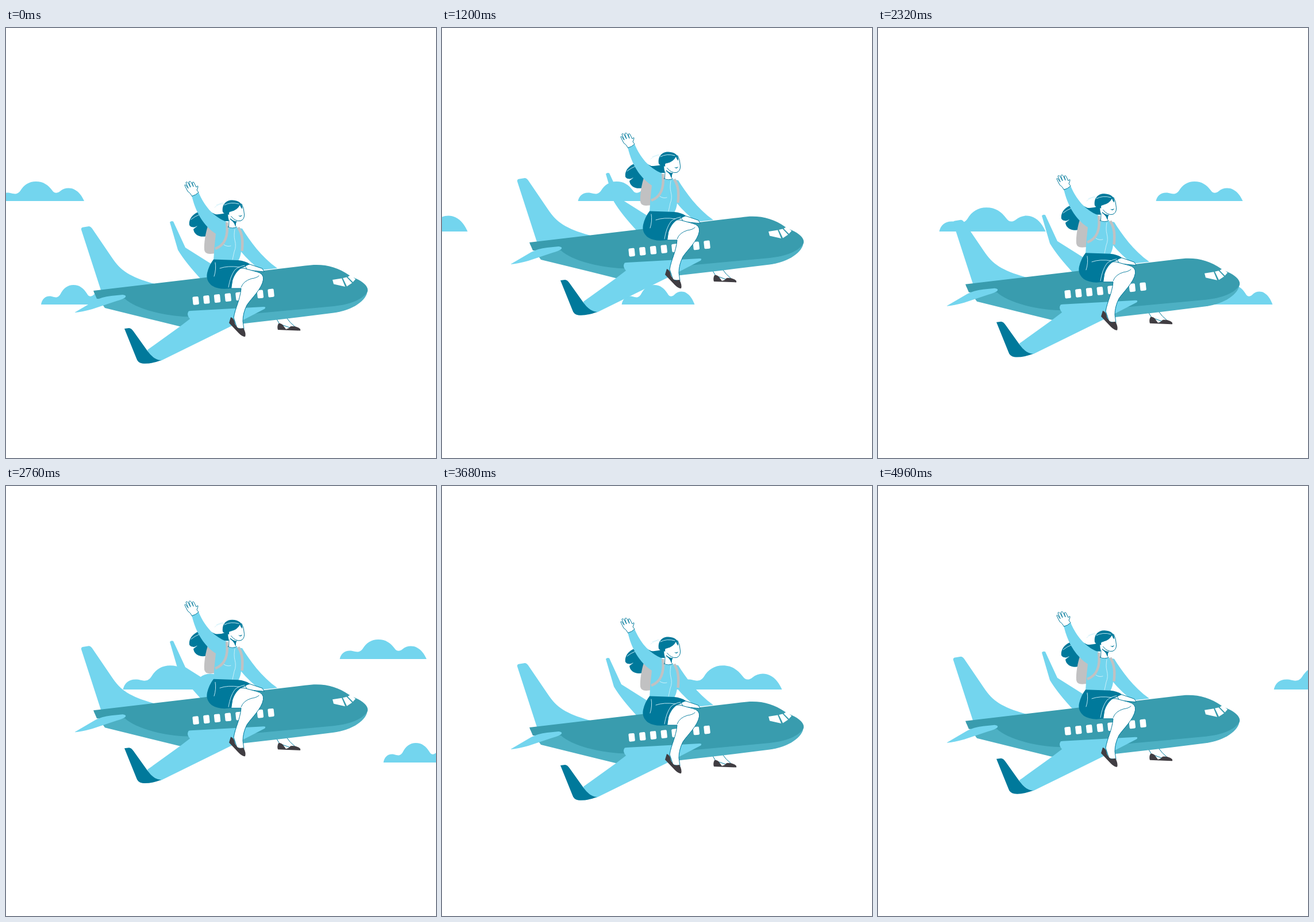
These frames come from a looping animation (748 by 748 pixels, 5000 ms). An HTML page:

```html
<!DOCTYPE html>
<html lang="en">
<head>
<meta charset="utf-8">
<title>Flying away</title>
<style>
  html, body { margin: 0; width: 100%; height: 100%; overflow: hidden; background: #fff; }
  svg { display: block; width: 100vw; height: 100vh; }
  .light { fill: #73d5ee; }
  .teal { fill: #399cae; }
  .belly { fill: #4db0c3; }
  .deep { fill: #00799b; }
  .grey { fill: #c1c1c2; }
  .shoe { fill: #403d42; }
  .white { fill: #fff; }
  .skin { fill: #fff; stroke: #00799b; stroke-width: 1; stroke-linejoin: round; stroke-linecap: round; }
  .line { fill: none; stroke: #00799b; stroke-width: .9; stroke-linecap: round; }
  .thin { fill: none; stroke: #d5f2fa; stroke-width: .9; stroke-linecap: round; }
  .strap { fill: none; stroke: #c1c1c2; stroke-width: 4.5; }
</style>
</head>
<body>
<svg viewBox="0 0 748 748">
  <defs>
    <path id="cloud" d="M0 0C2-10 10-16 22-14C30-12 35-11 40-18C46-28 55-34 67-34C80-34 88-28 95-19C99-13 104-13 109-17C116-23 126-24 134-20C142-16 147-9 151 0Z"/>
    <rect id="pane" width="10.4" height="14.2" rx="2" transform="rotate(-6)"/>
  </defs>

  <g id="clouds" class="light">
    <use href="#cloud" transform="translate(-15 301)"/>
    <use href="#cloud" transform="translate(61 481) scale(.84 1)"/>
    <use href="#cloud" transform="translate(-392 354) scale(1.225)"/>
  </g>

  <g id="plane">
    <!-- far leg and far wing -->
    <path class="skin" d="M470 505L476 515L496 522L502 519Q494 513 488 504Z"/>
    <path class="shoe" d="M474 514Q471 519 473 525L512 526.500Q513 523 508 521Q502 518 495 519Q492 523 487 524Q484 520 481 516Q477 513 474 514Z"/>
    <path class="light" d="M285 338Q287 335 291 336.500L312 382L358 411V440H342Q312 408 299 386Z"/>

    <!-- fuselage -->
    <path class="light" d="M131 351Q130 347 135 346.500L144 345Q147 345 150 349L184 399C200 423 216 433 258 445L240 456H165Z"/>
    <path class="belly" d="M153 460L172 487L302 519L415 514L485 506L570 495.500C603 491 628 474 629 456L540 440Z"/>
    <path class="teal" d="M152 457L258 444.500L520 413.500C550 409 574 414 597 430L609 436C622 442 631 450 629 458C622 472 598 481 570 484L440 496C390 502 350 504 308 502C258 498 222 485 207 471L158 471Z"/>
    <path class="light" d="M120 494.500L155 474Q166 468 183 466L203 464Q211 465 207 469Q203 472 192 475L150 489Q132 494 120 495Z"/>
    <g id="panes" class="white"></g>
    <path class="white" d="M568 438L584 435.500L590 450L570 445.500ZM586 435L592.500 433.500L602 443.500L593 449.500ZM594.500 433L600 429L608 437L603.500 442Z"/>

    <!-- near wing -->
    <path class="light" d="M317 494Q317 492 321 492L448 485Q453 485 450 488.500L394 517.500L270 578.500L250 578L246 560L303 519L320 506Q314 499 317 494Z"/>
    <path class="deep" d="M206 523L214 522Q218 522 222 528L247 563Q257 577 270 578Q251 585 237 583.500Q229 582 227 575Z"/>

    <!-- ponytail and backpack -->
    <path class="deep" d="M384 321Q374 325 364 324L350 317C331 317 317 329 319 343Q322 348 331 346L326 350C327 360 338 365 349 362L356 350L378 336L388 336Q386 329 386 322Z"/>
    <path class="thin" d="M326 348L332 345M322 333Q337 321 350 323"/>
    <path class="grey" d="M352 342C347 355 344 376 345 386Q346 393 355 393L366 392L370 346Z"/>

    <!-- sweater -->
    <path class="light" d="M323 291L335 286C345 309 359 327 383 337L388 347H401L411 349C424 370 444 398 472 418L443 421C430 412 418 400 409 389Q408 398 404 405H361Q362 381 365 358C342 343 329 318 323 291Z"/>
    <path class="strap" d="M384 338C387 361 381 378 364 384"/>
    <path class="strap" d="M404 347C412 359 412 373 410.500 388"/>
    <path class="thin" d="M398 350Q396 361 398 369Q401 380 397 389L394 403M379 377Q385 381 391 379"/>

    <!-- waving hand -->
    <path class="skin" d="M323.500 292.500Q321 287 316 284L311 274Q311 271 313.500 274L317 279L313 269Q314 266 317 270L321 277L318 268Q320 265 322.500 269L326 276L324 269Q326 266 328 271L331 277Q335 272 333.500 278L332 282L335 286Q330 291 323.500 292.500Z"/>

    <!-- head -->
    <path class="white" d="M388 328L387 347Q394 350 401 346L400 334Z"/>
    <path class="deep" d="M390 331Q396 337 402 336Q399 339 400 346L398 343Q397 338 390 333Z"/>
    <path class="line" d="M386 346Q394 350 401.500 346M388 334L387.500 346"/>
    <path class="skin" d="M389 314L410 306Q414 313 414.500 324Q415 333 408 335.500Q399 337 392 328Z"/>
    <path class="deep" d="M377 320C375 306 384 299 394 299.500C405 300 412 305 411 315Q408 312 407 308Q402 317 392 319L388 325L383 323Q379 323 377 320Z"/>
    <path class="white" d="M393 320Q388 318 388 323Q389 328 394 327Z"/>
    <path class="deep" d="M404 326Q408 328 411 325Q409 331 404 326Z"/>
    <path class="thin" d="M380 308Q391 302 405 306M363 312Q370 305 380 306M366 308L377 304"/>

    <!-- legs and skirt -->
    <path class="skin" d="M416 413L424 411L446 418.500L449 424L420 421Z"/>
    <path class="skin" d="M396 424Q402 417 414 418L436 424Q449 427 447.500 438C445 454 427 470 419 482Q412 496 412 510L414 524L402 522L396 504C399 486 407 474 409 453L392 453Z"/>
    <path class="line" d="M409 451Q413 440 427 436Q436 435 440 431"/>
    <path class="deep" d="M361 402.500L404 404Q416 405 424 410.500L414 416C403 419 394 432 391 453Q370 456 358 448Q347 439 350 426Q353 413 361 402.500Z"/>
    <path class="thin" d="M364 408Q366 420 362 432M372 418Q386 413 406 416M387 451Q390 432 398 421Q404 415 415 413"/>
    <path class="shoe" d="M391 503Q397 505 398 514Q401 521 406 523L413 522Q418 531 416 537Q411 537 405 531L388 513Z"/>
  </g>
</svg>

<script>
  const LOOP = 5000;    // ms
  const PAUSE = 60;     // ms before anything moves
  const SWING = 995;    // ms from one turn of the plane to the next
  const DRIFT = 0.2205; // cloud speed in px per ms
  const TURNS = [0, -102.5, 23, -102.5, 0, -52];

  const clouds = document.getElementById('clouds');
  const plane = document.getElementById('plane');
  const panes = document.getElementById('panes');

  for (let i = 0; i < 8; i++) {
    // a leg hides this one
    if (i === 5) continue;
    const pane = document.createElementNS('http://www.w3.org/2000/svg', 'use');
    pane.setAttribute('href', '#pane');
    pane.setAttribute('transform', `translate(${324.2 + i * 18.7} ${467.8 - i * 1.9})`);
    panes.append(pane);
  }

  function height(time) {
    const turn = Math.floor(time / SWING);
    const part = time / SWING - turn;
    return TURNS[turn] + (TURNS[turn + 1] - TURNS[turn]) * part;
  }

  function draw(now) {
    const time = Math.max(0, now % LOOP - PAUSE);
    clouds.setAttribute('transform', `translate(${time * DRIFT} 0)`);
    plane.setAttribute('transform', `translate(0 ${height(time)})`);
    requestAnimationFrame(draw);
  }

  draw(0);
</script>
</body>
</html>
```
